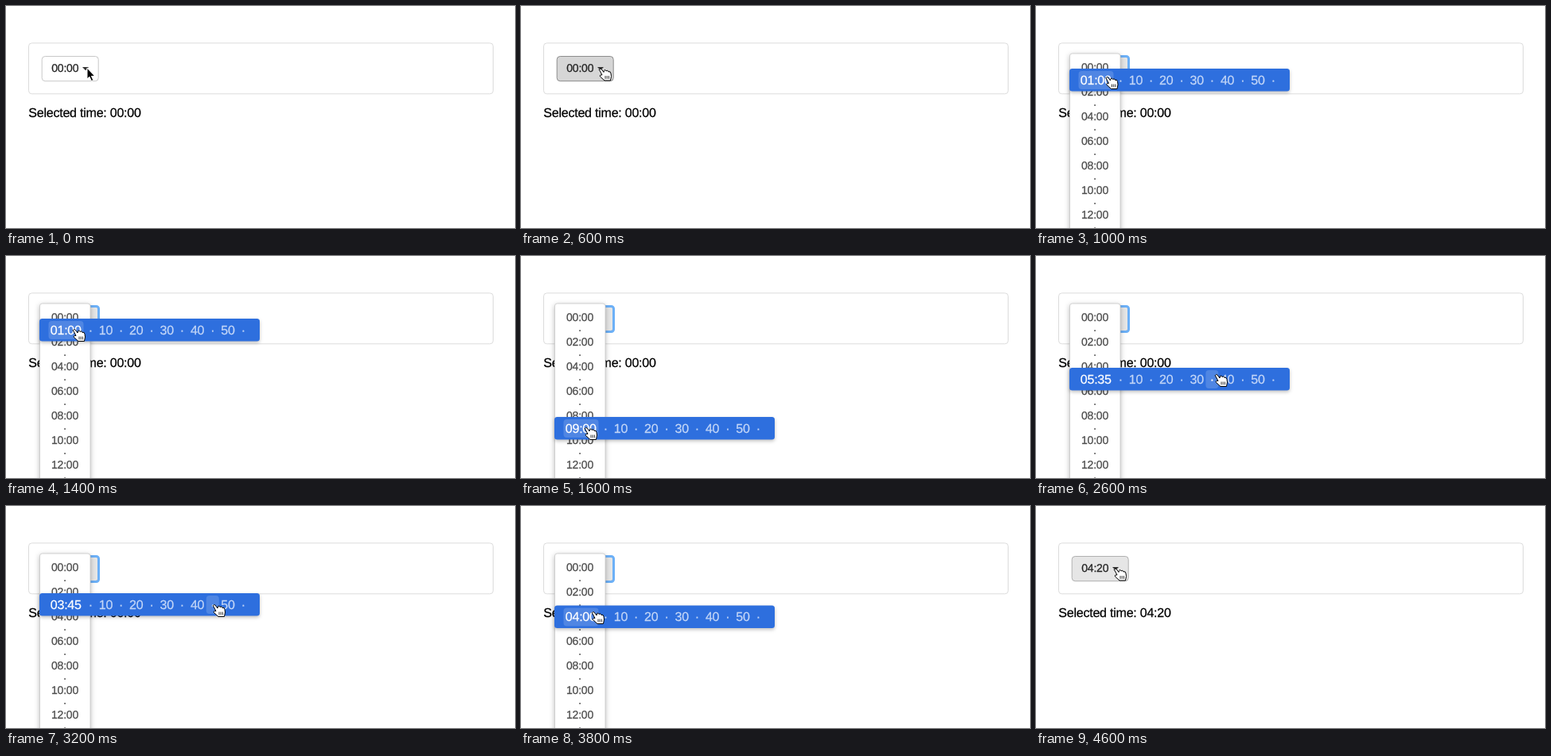
Animation, 640 px wide and 280 px high, one loop 4800 ms. Source, as an HTML page:

```html
<!DOCTYPE html>
<html lang="en">
<head>
<meta charset="utf-8">
<title>Time picker</title>
<style>
  html, body { margin: 0; width: 100%; height: 100%; overflow: hidden; background: #fff; }
  svg { display: block; width: 640px; height: 280px; font: 16px "Liberation Sans", Arial, sans-serif; letter-spacing: -.014em; }
  text { text-rendering: geometricPrecision; stroke: currentColor; stroke-width: .25px; }
  .small { font-size: 14px; }
  .mid { text-anchor: middle; }
  #face { fill: #fff; stroke: #c8c8c8; }
  .hover #face { fill: #e6e6e6; stroke: #b0b0b0; }
  .active #face { fill: #d6d6d6; stroke: #8c8c8c; }
  #label { fill: #222; color: #222; }
  #ring { fill: none; stroke: #6cb0f7; stroke-width: 3; }
  #menu { filter: drop-shadow(0 2px 3px rgba(0, 0, 0, .28)); }
  #hours { fill: #4a4a4a; color: #4a4a4a; }
  #bar { filter: drop-shadow(0 2px 2px rgba(0, 0, 0, .25)); }
  #bar text { fill: #c3d6f7; color: #c3d6f7; }
  #bar text.on { fill: #fff; color: #fff; }
  #mark { fill: #fff; fill-opacity: .16; }
  .cursor { stroke-linejoin: round; stroke-linecap: round; }
</style>
</head>
<body>
<svg viewBox="0 0 640 280">
  <rect x="28.5" y="46.800" width="584" height="64" rx="4" fill="#fff" stroke="#dcdcdc"/>
  <text x="28.300" y="140.300">Selected time: <tspan id="result"></tspan></text>

  <g id="button">
    <rect id="face" x="45.200" y="63.500" width="71" height="31.200" rx="4"/>
    <rect id="ring" x="44.500" y="63.500" width="72" height="32" rx="3"/>
    <text id="label" class="small" x="57.300" y="83.300"></text>
    <path d="M96 77h8l-4 4.200z" fill="#333"/>
  </g>

  <g id="popup">
    <rect id="menu" x="42.500" y="60" width="63.500" height="240" rx="3" fill="#fff" stroke="#c8c8c8" stroke-width=".8"/>
    <g id="hours" class="small mid"></g>
    <g id="bar">
      <rect x="42" y="63.500" width="277" height="28.500" rx="3.500" fill="#2e6fde"/>
      <rect id="mark" y="66.500" height="23" rx="4"/>
      <text id="picked" class="on" x="55.800" y="83"></text>
      <g id="minutes" class="mid"></g>
    </g>
  </g>

  <path id="arrow" class="cursor" fill="#000" stroke="#fff" d="M0 0V13.500L3 10.800L5.400 16L7.800 15L5.400 10H9.500Z"/>
  <g id="hand" class="cursor" fill="#fff" stroke="#000">
    <path d="M-3.500 1.500Q-2.500-.5-.8 1.200L2 5Q3-.2 5 3.500Q7 1.500 8 4.500Q10.500 3 11 6.500L11.500 10L10.500 15.500H3L-2.500 10.500Q-3.500 8 0 8.500L-3.500 2Z"/>
    <path d="M4 10v3M6.200 10v3M8.400 10v3" stroke-width=".8"/>
  </g>
  <path id="beam" class="cursor" fill="none" stroke="#000" d="M-3-7Q0-7 0-5Q0-7 3-7M0-5V5M-3 7Q0 7 0 5Q0 7 3 7"/>
</svg>
<script>
  const LOOP = 4800, STEP = 200, ROW = 15.5;
  const OPEN = 800, MINUTES = 2400, CLOSE = 4400;
  const $ = id => document.getElementById(id);
  const pad = n => String(n).padStart(2, '0');
  const show = (el, on) => { el.style.display = on ? '' : 'none'; };
  const minuteX = m => 87 + 3.84 * m;
  const rowY = h => 77.7 + ROW * h;
  const snap = (v, unit) => Math.round(v / unit) * unit;

  function addText(parent, x, y, str) {
    const el = document.createElementNS('http://www.w3.org/2000/svg', 'text');
    el.setAttribute('x', x);
    el.setAttribute('y', y);
    el.textContent = str;
    parent.append(el);
    return el;
  }

  for (let h = 0; h < 14; h++)
    addText($('hours'), 74, rowY(h) + 4.7, h % 2 ? '·' : pad(h) + ':00');

  const minutes = [];
  for (let m = 5; m < 60; m += 5)
    minutes.push(addText($('minutes'), minuteX(m), 83, m % 10 ? '·' : m));

  // Pointer goals while the list is open: [time, x, y], eased in between
  const goals = [
    [800, 100, 79], [1000, 91.5, 89], [1200, 90, 103], [1400, 88, 92],
    [1600, 84, 216], [1800, 83, 228], [2000, 81, 198], [2400, 162, 152],
    [2600, 229, 149], [3000, 306, 148], [3200, 264, 124], [3600, 95, 123],
    [3800, 93, 133], [4000, 268, 137], [4200, 162, 135]
  ];

  function pointerAt(t) {
    const i = goals.findLastIndex(g => g[0] <= t);
    const [t0, x0, y0] = goals[i], [t1, x1, y1] = goals[i + 1] || [CLOSE, x0, y0];
    const k = (1 - Math.cos(Math.PI * (t - t0) / (t1 - t0))) / 2;
    return { x: x0 + (x1 - x0) * k, y: y0 + (y1 - y0) * k };
  }

  // The row and the minute follow from where the pointer is
  function drawBar({ x, y }, t) {
    const hour = Math.round((y - rowY(0)) / ROW);
    const minute = t < MINUTES || x < 100 ? 0 : Math.min(55, snap((x - 87) / 3.84, 5));
    const width = minute === 0 ? 44 : minute % 10 ? 16 : 24;
    $('bar').setAttribute('transform', `translate(0 ${ROW * hour})`);
    $('picked').textContent = pad(hour) + ':' + pad(minute);
    $('mark').setAttribute('x', (minute ? minuteX(minute) : 75.5) - width / 2);
    $('mark').setAttribute('width', width);
    minutes.forEach((el, i) => el.classList.toggle('on', (i + 1) * 5 === minute));
  }

  function draw(t) {
    const open = t >= OPEN && t < CLOSE;
    const done = t >= CLOSE;
    const away = done && t < CLOSE + STEP;
    const cursor = t < STEP ? 'arrow' : away ? 'beam' : 'hand';
    const state = t < STEP || away ? '' : t >= 600 && t < OPEN ? 'active' : 'hover';
    const p = open ? pointerAt(t) : away ? { x: 163.5, y: 136 } : { x: 102, y: 78.5 };

    $('button').setAttribute('class', state);
    $('label').textContent = $('result').textContent = done ? '04:20' : '00:00';
    show($('ring'), open);
    show($('popup'), open);
    if (open) drawBar(p, t);
    for (const id of ['arrow', 'hand', 'beam']) show($(id), id === cursor);
    $(cursor).setAttribute('transform', `translate(${p.x} ${p.y})`);
  }

  let last;
  function tick() {
    const t = Math.floor(performance.now() % LOOP / STEP) * STEP;
    if (t !== last) draw(last = t);
    requestAnimationFrame(tick);
  }
  tick();
</script>
</body>
</html>
```
